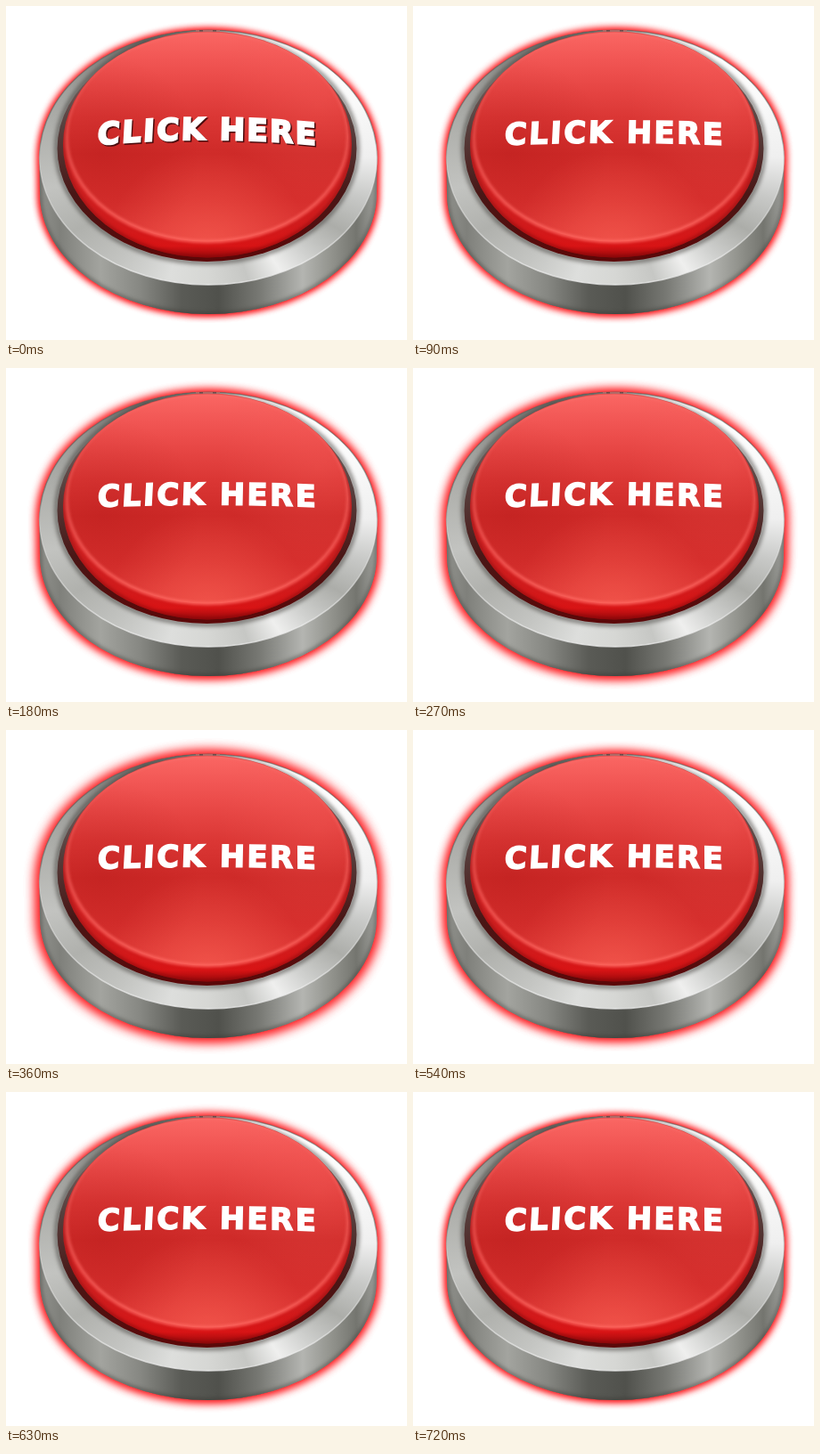
Animation of 450 by 375 pixels, one loop 0.81 s. Source, as an HTML page with a canvas:

```html
<!DOCTYPE html>
<html lang="en">
<head>
<meta charset="utf-8">
<title>Glowing button</title>
<style>
  html, body { margin: 0; width: 100%; height: 100%; overflow: hidden; background: #fff; }
  canvas { display: block; }
</style>
</head>
<body>
<canvas id="stage" width="450" height="375"></canvas>
<script>
const ctx = document.getElementById('stage').getContext('2d');
const STEP = 90;
const LEVELS = [0, 1, 2, 3, 4, 4, 3, 2, 1];

const RIM = [227, 170, 189.5, 143];
const FOOT = [227, 211, 189, 135];
const GAP = [225.5, 160, 168, 127];
const DOME = [226, 155.5, 162, 127];
const FACE = [226, 147, 158, 117.5];

function oval([cx, cy, rx, ry], grow = 0) {
  const path = new Path2D();
  path.ellipse(cx, cy, rx + grow, ry + grow, 0, 0, Math.PI * 2);
  return path;
}

// Upper half of the rim joined to the lower half of the foot
function bodyPath() {
  const path = new Path2D();
  path.ellipse(...RIM, 0, Math.PI, Math.PI * 2);
  path.ellipse(...FOOT, 0, 0, Math.PI);
  path.closePath();
  return path;
}

function stops(gradient, list) {
  list.forEach(([at, color]) => gradient.addColorStop(at, color));
  return gradient;
}

const vertical = (y0, y1, list) => stops(ctx.createLinearGradient(0, y0, 0, y1), list);
const horizontal = (x0, x1, list) => stops(ctx.createLinearGradient(x0, 0, x1, 0), list);
const around = (cx, cy, list) => stops(ctx.createConicGradient(0, cx, cy), list);
const radial = (cx, cy, r, list) => stops(ctx.createRadialGradient(cx, cy, 0, cx, cy, r), list);

function fillStage(style) {
  ctx.fillStyle = style;
  ctx.fillRect(0, 0, 450, 375);
}

function inside(path, paint) {
  ctx.save();
  ctx.clip(path);
  paint();
  ctx.restore();
}

function softLine(path, color, width, blur) {
  ctx.save();
  ctx.filter = `blur(${blur}px)`;
  ctx.strokeStyle = color;
  ctx.lineWidth = width;
  ctx.stroke(path);
  ctx.restore();
}

function drawGlow(level) {
  const body = bodyPath();
  ctx.save();
  ctx.shadowColor = '#ff1c20';
  ctx.shadowBlur = 8 + level * 1.7;
  ctx.fillStyle = '#d8393a';
  for (let i = 0; i < 3; i++) ctx.fill(body);
  ctx.restore();
}

function drawBase() {
  const body = bodyPath();
  inside(body, () => {
    fillStage(horizontal(38, 416, [
      [0, '#90918c'], [0.06, '#7f807b'], [0.18, '#a3a49f'], [0.3, '#868782'],
      [0.42, '#5a5b56'], [0.53, '#50514c'], [0.65, '#777873'], [0.78, '#b4b5b1'],
      [0.86, '#94958f'], [0.94, '#74756f'], [1, '#a0a19d']
    ]));
    softLine(body, 'rgba(50,50,46,.5)', 4, 2);
  });

  const rim = oval(RIM);
  inside(rim, () => {
    fillStage(around(227, 170, [
      [0, '#efefef'], [0.04, '#c8c9c7'], [0.08, '#acada9'], [0.125, '#d0d1cf'],
      [0.16, '#efefee'], [0.2, '#c6c7c4'], [0.25, '#d6d7d4'], [0.3, '#dddedc'],
      [0.36, '#c4c5c2'], [0.42, '#b0b1ad'], [0.47, '#c2c3c0'], [0.52, '#b2b3af'],
      [0.57, '#a0a19d'], [0.62, '#82837f'], [0.67, '#61625e'], [0.72, '#777874'],
      [0.77, '#acada9'], [0.81, '#e8e8e8'], [0.87, '#fff'], [0.94, '#fafafa'], [1, '#efefef']
    ]));
    softLine(oval(GAP, 1), 'rgba(60,58,54,.55)', 5, 2);
  });
  softLine(rim, vertical(150, 313, [[0, 'rgba(95,95,90,.5)'], [0.2, 'rgba(240,240,240,.3)'], [1, 'rgba(240,240,240,.75)']]), 1.5, 0.5);
}

function drawDome() {
  ctx.fillStyle = vertical(33, 287, [[0, '#8a7572'], [0.4, '#57403e'], [0.7, '#491716'], [1, '#5c0708']]);
  ctx.fill(oval(GAP));

  const dome = oval(DOME);
  const face = oval(FACE);
  inside(dome, () => {
    fillStage(vertical(29, 282, [
      [0, '#f05a57'], [0.4, '#cd2a29'], [0.85, '#d01b1c'], [0.95, '#d81415'], [1, '#9d0a0c']
    ]));
    softLine(dome, vertical(60, 282, [[0, 'rgba(130,15,18,.3)'], [1, 'rgba(120,5,8,.7)']]), 4, 2);
  });

  inside(face, () => {
    fillStage(vertical(30, 264, [
      [0, '#fa6663'], [0.2, '#ec4d4b'], [0.4, '#db3735'], [0.58, '#ce2a28'], [0.8, '#d62f2d'], [1, '#e03a37']
    ]));
    fillStage(radial(226, 275, 115, [[0, 'rgba(255,105,90,.55)'], [1, 'rgba(255,105,90,0)']]));
    fillStage(radial(350, 110, 110, [[0, 'rgba(255,105,100,.25)'], [1, 'rgba(255,105,100,0)']]));
    fillStage(radial(110, 165, 110, [[0, 'rgba(165,15,15,.22)'], [1, 'rgba(165,15,15,0)']]));
  });

  inside(dome, () => {
    softLine(face, vertical(90, 264, [
      [0, 'rgba(255,125,120,.2)'], [0.6, 'rgba(255,105,100,.6)'], [1, 'rgba(255,105,98,.8)']
    ]), 4, 1.8);
  });

  // Small notch at the far edge
  ctx.fillStyle = '#b06a67';
  ctx.fillRect(213, 27, 27, 1.5);
  ctx.fillStyle = '#6b4a48';
  ctx.fillRect(217, 27, 4, 1.5);
  ctx.fillRect(232, 27, 4, 1.5);
}

// Letters follow an arch of the given depth
function eachLetter(arch, paint) {
  const text = 'CLICK HERE';
  const left = 102, right = 348, mid = 225;
  const widths = [...text].map(c => ctx.measureText(c).width);
  const total = widths.reduce((a, b) => a + b, 0);
  const gap = (right - left - total) / (text.length - 1);
  let x = left;
  [...text].forEach((letter, i) => {
    const cx = x + widths[i] / 2;
    const d = (cx - mid) / 122;
    ctx.save();
    ctx.transform(1, d * arch * 0.016, -0.03 + d * 0.04, 1, cx, 156 - arch * (1 - d * d));
    paint(letter);
    ctx.restore();
    x += widths[i] + gap;
  });
}

function drawText(raised) {
  const arch = raised ? 6 : 2.5;
  const weight = raised ? 2.2 : 1.5;
  const print = (color, shift) => {
    ctx.fillStyle = ctx.strokeStyle = color;
    eachLetter(arch, c => {
      ctx.strokeText(c, shift, shift);
      ctx.fillText(c, shift, shift);
    });
  };
  ctx.font = 'bold 34px "DejaVu Sans", sans-serif';
  ctx.textAlign = 'center';
  ctx.lineJoin = 'miter';
  ctx.miterLimit = 3;
  ctx.lineWidth = weight;
  if (raised) print('#4a0c0e', 1.5);
  print('#fff', 0);
}

function draw(level) {
  fillStage('#fff');
  drawGlow(level);
  drawBase();
  drawDome();
  drawText(level === 0);
}

let shown = -1;
const start = performance.now();

function tick() {
  const elapsed = performance.now() - start;
  const level = LEVELS[Math.floor(elapsed / STEP) % LEVELS.length];
  if (level !== shown) {
    draw(level);
    shown = level;
  }
  requestAnimationFrame(tick);
}
tick();
</script>
</body>
</html>
```
